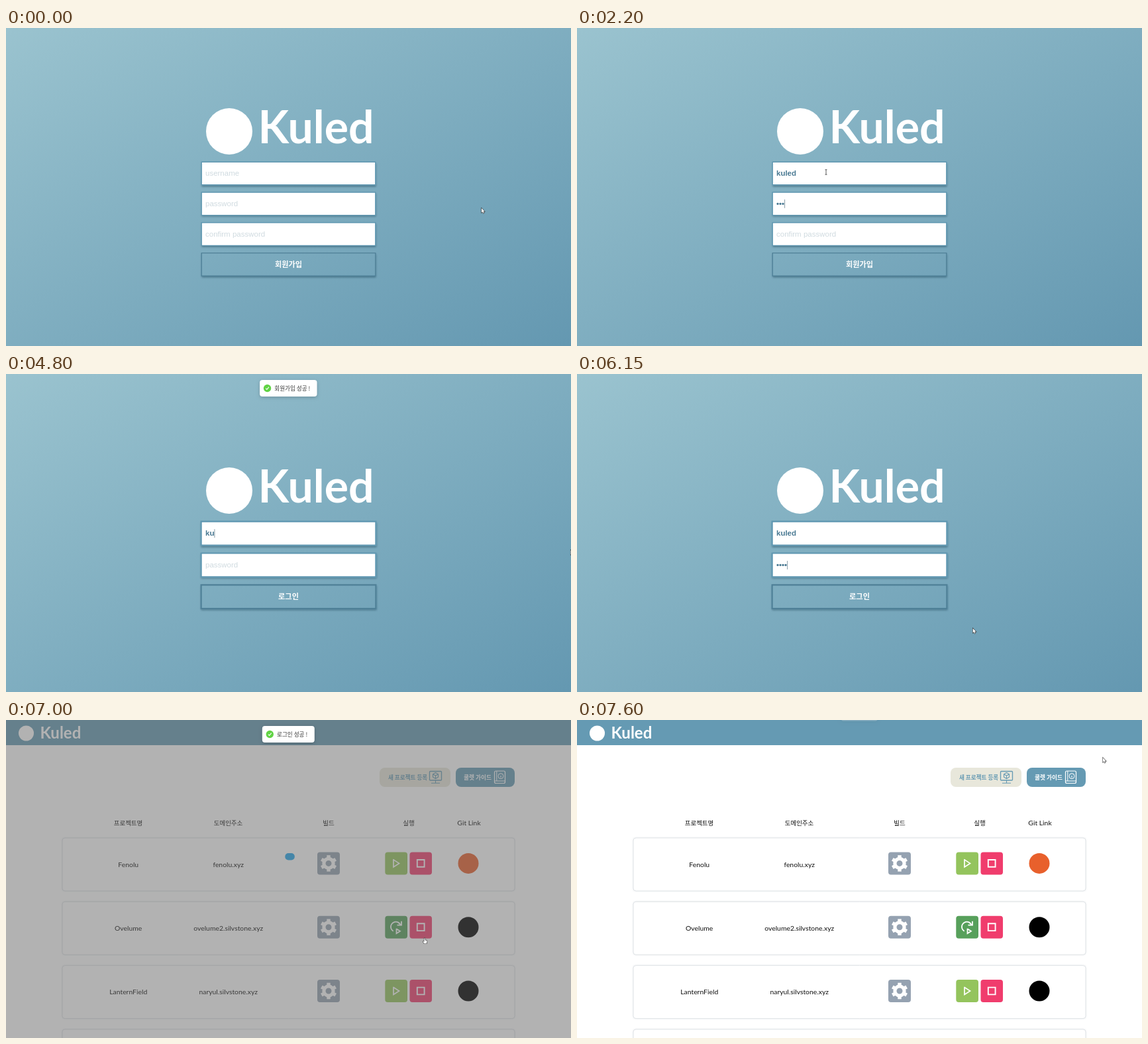
An HTML page with a canvas for the animation above (7.65 s loop, 853 px wide and 480 px high).

```html
<!DOCTYPE html>
<html lang="ko">
<head>
<meta charset="utf-8">
<title>Sign up and log in</title>
<style>
html, body { margin: 0; width: 100%; height: 100%; overflow: hidden; }
canvas { display: block; }
</style>
</head>
<body>
<canvas id="stage" width="853" height="480"></canvas>
<script>
const c = document.getElementById('stage').getContext('2d');
const W = 853, H = 480, LOOP = 7650;
const LOGIN = 3800, DASH = 6500;
const BLUE = '#659ab3';
const KR = '"Noto Sans CJK KR", "Noto Sans CJK", sans-serif';
const ARIAL = '"Liberation Sans", Arial, sans-serif';
const LATO = 'Lato, sans-serif';

const clamp = v => Math.min(1, Math.max(0, v));
const ramp = (t, a, b) => clamp((t - a) / (b - a));

function bezier(x1, y1, x2, y2, x) {
  const at = (p, q, s) => 3 * (1 - s) ** 2 * s * p + 3 * (1 - s) * s * s * q + s ** 3;
  let lo = 0, hi = 1;
  for (let i = 0; i < 24; i++) {
    const m = (lo + hi) / 2;
    if (at(x1, x2, m) < x) lo = m; else hi = m;
  }
  return at(y1, y2, lo);
}

function text(s, x, y, font, color, align = 'left') {
  c.font = font;
  c.fillStyle = color;
  c.textAlign = align;
  c.fillText(s, x, y);
}

function box(x, y, w, h, r, fill, stroke, line = 1) {
  c.beginPath();
  c.roundRect(x, y, w, h, r);
  if (fill) { c.fillStyle = fill; c.fill(); }
  if (stroke) { c.strokeStyle = stroke; c.lineWidth = line; c.stroke(); }
}

function disc(x, y, r, fill) {
  c.fillStyle = fill;
  c.beginPath();
  c.arc(x, y, r, 0, 7);
  c.fill();
}

function lines(color, width, ...paths) {
  c.strokeStyle = color;
  c.lineWidth = width;
  c.beginPath();
  for (const p of paths) {
    for (let i = 0; i < p.length; i += 2) c[i ? 'lineTo' : 'moveTo'](p[i], p[i + 1]);
  }
  c.stroke();
}

// Drop shadow drawn only outside the box
function outerShadow(x, y, w, h, r, color, dy, blur) {
  c.save();
  c.beginPath();
  c.rect(0, 0, W, H);
  c.roundRect(x, y, w, h, r);
  c.clip('evenodd');
  c.shadowColor = color;
  c.shadowOffsetY = dy;
  c.shadowBlur = blur;
  // The casting box sits off stage so its own edge never shows
  c.shadowOffsetX = 2 * W;
  box(x - 2 * W, y, w, h, r, '#000');
  c.restore();
}

// ---- forms ----
const dots = '••••';
const field = (hint, value, start, step, focus, blur) => ({ hint, value, start, step, focus, blur });
const signup = {
  top: 201.5, pitch: 45.8, x: 294.5, w: 264, h: 36, line: 1.4, base: 21.5, logo: 0, label: '회원가입',
  fields: [
    field('username', 'kuled', 950, 110, 800, 1700),
    field('password', dots, 1950, 100, 1700, 2450),
    field('confirm password', dots, 2600, 100, 2450, 3750)
  ]
};
const login = {
  top: 221.6, pitch: 47.8, x: 293.5, w: 266, h: 38, line: 2.2, base: 22.6, logo: 20, label: '로그인',
  fields: [
    field('username', 'kuled', 4640, 110, 4250, 5300),
    field('password', dots, 5450, 90, 5300, 6450)
  ]
};

function drawBackground() {
  const g = c.createLinearGradient(221.5, -124.5, 631.5, 604.5);
  g.addColorStop(0, '#9ac3cf');
  g.addColorStop(1, '#6498b1');
  c.fillStyle = g;
  c.fillRect(0, 0, W, H);
}

function drawField(f, form, y, t) {
  const n = t < f.start ? 0 : Math.min(f.value.length, 1 + Math.floor((t - f.start) / f.step));
  const shown = f.value.slice(0, n), font = 'bold 11.5px ' + ARIAL;
  if (n) text(shown, 301, y + form.base, font, '#4a7a93');
  else text(f.hint, 301, y + form.base, '11.5px ' + ARIAL, '#d0dbe0');
  if (t >= f.focus && t < f.blur) {
    c.font = font;
    const x = 301.5 + c.measureText(shown).width;
    lines('#6d8794', 0.8, [x, y + form.base - 10, x, y + form.base + 3]);
  }
}

function drawForm(form, t) {
  const { x, w, h, line, top, pitch, fields } = form;
  drawBackground();
  disc(337, 156 + form.logo, 35, '#fff');
  text('Kuled', 380.5, 174 + form.logo, 'bold 68px ' + LATO, '#fff');
  for (let i = 0; i <= fields.length; i++) {
    const y = top + i * pitch, button = i === fields.length;
    outerShadow(x, y, w, h, 0, 'rgba(30,70,90,.55)', 2, 3);
    box(x + line / 2, y + line / 2, w - line, h - line, 0,
      button ? null : '#fff', button ? '#4f8097' : '#5f97b1', line);
    if (button) text(form.label, 426.5, y + form.base + 0.5, 'bold 11.2px ' + KR, '#fff', 'center');
    else drawField(fields[i], form, y, t);
  }
}

// ---- dashboard ----
const rows = [
  ['Fenolu', 'fenolu.xyz', '#e8602c'],
  ['Ovelume', 'ovelume2.silvstone.xyz', '#000'],
  ['LanternField', 'naryul.silvstone.xyz', '#000'],
  ['', '', '#000']
];

function drawGear(x, y) {
  c.strokeStyle = '#fff';
  c.lineWidth = 5.2;
  c.beginPath();
  c.arc(x, y, 7.1, 0, 7);
  c.stroke();
  c.lineWidth = 5.4;
  for (let i = 0; i < 6; i++) {
    const a = Math.PI * (i / 3 + 0.5), u = Math.cos(a), v = Math.sin(a);
    c.beginPath();
    c.moveTo(x + 7 * u, y + 7 * v);
    c.lineTo(x + 12.3 * u, y + 12.3 * v);
    c.stroke();
  }
}

function drawRow([name, host, mark], i) {
  const y = 178 + i * 96.3, mid = y + 38.4;
  outerShadow(85, y, 683, 80, 4, 'rgba(90,110,130,.2)', 0, 3);
  box(85, y, 683, 80, 4, '#fff', '#dfe3e6');
  if (!name) return;
  text(name, 184.7, y + 43.5, '10.4px ' + LATO, '#111', 'center');
  text(host, 335.7, y + 43.5, '10.4px ' + LATO, '#111', 'center');
  box(470, mid - 17, 34, 34, 4, '#95a2b1');
  drawGear(487, mid);
  box(572.3, mid - 17, 33.7, 34, 4, i === 1 ? '#57a05b' : '#94c45d');
  if (i === 1) {
    c.strokeStyle = '#fff';
    c.lineWidth = 1.8;
    c.beginPath();
    c.arc(588.5, mid - 0.5, 7.6, 2.1, 5.9);
    c.stroke();
    lines('#fff', 1.8, [597, mid - 9, 597, mid - 3, 590.5, mid - 3], [589.5, mid + 2.5, 595, mid + 6, 589.5, mid + 9.5, 589.5, mid + 2]);
  } else {
    lines('#fff', 1.7, [585, mid - 5.5, 593.5, mid, 585, mid + 5.5, 585, mid - 6.3]);
  }
  box(609.5, mid - 17, 33.5, 34, 4, '#f03d6d');
  box(620.8, mid - 5.4, 10.8, 10.8, 0, null, '#fff', 1.9);
  disc(698, mid, 15.5, mark);
}

function drawTopButtons() {
  box(564, 72, 107, 29, 8, '#e8e7db');
  text('새 프로젝트 등록', 577, 89.8, 'bold 8.6px ' + KR, BLUE);
  box(639.5, 77.5, 18, 13.5, 1, null, BLUE, 1.3);
  lines(BLUE, 1.1, [648.5, 91, 648.5, 95], [642, 95.3, 655, 95.3],
    [648.5, 79.5, 652.5, 81.8, 652.5, 86.3, 648.5, 88.6, 644.5, 86.3, 644.5, 81.8, 648.5, 79.5],
    [644.5, 81.8, 648.5, 84, 652.5, 81.8], [648.5, 84, 648.5, 88.6]);
  box(679, 72, 89, 29, 8, BLUE);
  text('쿨렛 가이드', 691, 89.8, 'bold 8.7px ' + KR, '#fff');
  box(737.5, 77, 16, 18.5, 2, null, '#fff', 1.2);
  lines('#fff', 1, [740.8, 77, 740.8, 92], [737.5, 92, 753.5, 92], [747, 84, 747, 87]);
  c.beginPath();
  c.arc(747, 84.7, 4, 0, 7);
  c.stroke();
}

function drawDashboard(t) {
  c.fillStyle = '#fff';
  c.fillRect(0, 0, W, H);
  c.fillStyle = BLUE;
  c.fillRect(0, 0, W, 38);
  disc(30.5, 20, 11.5, '#fff');
  text('Kuled', 51.5, 28, 'bold 24px ' + LATO, '#fff');
  drawTopButtons();
  [['프로젝트명', 184.5], ['도메인주소', 335.5], ['빌드', 487], ['실행', 608]].forEach(([s, x]) =>
    text(s, x, 158.6, '9.5px ' + KR, '#111', 'center'));
  text('Git Link', 699, 158.6, '10.4px ' + LATO, '#111', 'center');
  if (t >= 6750) rows.forEach(drawRow);

  const veil = 1 - ramp(t, 6900, 7115);
  if (veil) {
    c.fillStyle = `rgba(100,100,100,${0.94 * veil})`;
    c.fillRect(0, 0, W, H);
    const drift = ramp(t, 6550, 7000);
    c.globalAlpha = Math.min(1, veil * 2);
    box(418.8 + 2.5 * drift, 201, 13.5 + drift, 10.5, 5, '#4586a8');
    c.globalAlpha = 1;
  }
}

// ---- toast ----
function drawToast(t, start, label, w) {
  const enter = ramp(t, start, start + 175), leave = ramp(t, start + 1013, start + 1213);
  if (!enter || leave === 1) return;
  const a = bezier(0.21, 1.02, 0.73, 1, enter), b = bezier(0.06, 0.71, 0.55, 1, leave);
  c.save();
  c.globalAlpha = (0.5 + 0.5 * a) * (1 - b);
  c.translate(426.3, 21.5 - 50 * (1 - a) - 37.5 * b);
  c.scale(1 - 0.4 * (1 - a) - 0.4 * b, 1 - 0.4 * (1 - a) - 0.4 * b);
  c.shadowColor = 'rgba(0,0,0,.2)';
  c.shadowBlur = 5;
  c.shadowOffsetY = 1.5;
  box(-w / 2, -12.5, w, 25, 4, '#fff');
  c.shadowColor = 'transparent';
  const x = 11.5 - w / 2;
  // The badge pops in a little later, then its tick
  disc(x, 0, 5.7 * bezier(0.175, 0.885, 0.32, 1.275, ramp(t, start + 50, start + 200)), '#61d345');
  if (t > start + 150) lines('#fff', 1.1, [x - 2.4, 0.2, x - 0.7, 1.9, x + 2.4, -1.8]);
  text(label, x + 10.7, 3.1, '8.6px ' + KR, '#363636');
  c.restore();
}

// ---- pointer ----
const path = [
  [0, 718, 272], [100, 718, 272], [700, 376, 217.5], [3100, 376, 217.5], [3500, 434.5, 360],
  [3850, 434.5, 360], [4000, 420, 300], [4200, 400, 243], [4450, 400, 243], [4800, 852.5, 266],
  [4850, 875, 270], [5750, 875, 400], [6000, 690, 415], [6350, 458, 337], [6650, 458, 337],
  [7000, 632, 329.5], [7350, 810, 85], [7600, 794, 57], [LOOP, 794, 57]
];

function pointerAt(t) {
  const i = path.findIndex(k => k[0] > t), [a, ax, ay] = path[i - 1], [b, bx, by] = path[i];
  const k = (t - a) / (b - a), e = k * k * (3 - 2 * k);
  return [ax + (bx - ax) * e, ay + (by - ay) * e];
}

function pointerKind(t, x, y) {
  if (t >= DASH) return t < 7050 ? 'hand' : 'arrow';
  const f = t < LOGIN ? signup : login, i = Math.floor((y - f.top) / f.pitch);
  const inside = x > f.x && x < f.x + f.w && i >= 0 && i <= f.fields.length && y - f.top - i * f.pitch < f.h;
  return !inside ? 'arrow' : i === f.fields.length ? 'hand' : 'beam';
}

const arrow = new Path2D('M0 0V7.6L1.7 6L3 8.7L4.2 8.1L3 5.5H5.3Z');
const hand = new Path2D('M-.7 0Q0-.8.7 0V3L3.8 4Q4.3 4.4 4 6L3.2 9H-.8L-3 5.6Q-2.6 4.4-.7 6Z');

function drawPointer(t) {
  const [x, y] = pointerAt(t), kind = pointerKind(t, x, y);
  c.save();
  c.translate(x, y);
  if (kind === 'beam') {
    lines('#333', 0.8, [0, -3.5, 0, 3.5], [-1.5, -3.7, 1.5, -3.7], [-1.5, 3.7, 1.5, 3.7]);
  } else {
    const shape = kind === 'hand' ? hand : arrow;
    c.scale(0.88, 0.88);
    c.strokeStyle = '#333';
    c.lineWidth = 1.3;
    c.stroke(shape);
    c.fillStyle = '#fff';
    c.fill(shape);
  }
  c.restore();
}

function draw(now) {
  const t = now % LOOP;
  if (t < LOGIN) drawForm(signup, t);
  else if (t < DASH) drawForm(login, t);
  else drawDashboard(t);
  drawToast(t, 3817, '회원가입 성공 !', 86.5);
  drawToast(t, 6517, '로그인 성공 !', 79);
  drawPointer(t);
}

const begin = performance.now();
(function tick() {
  draw(performance.now() - begin);
  requestAnimationFrame(tick);
})();
</script>
</body>
</html>
```
